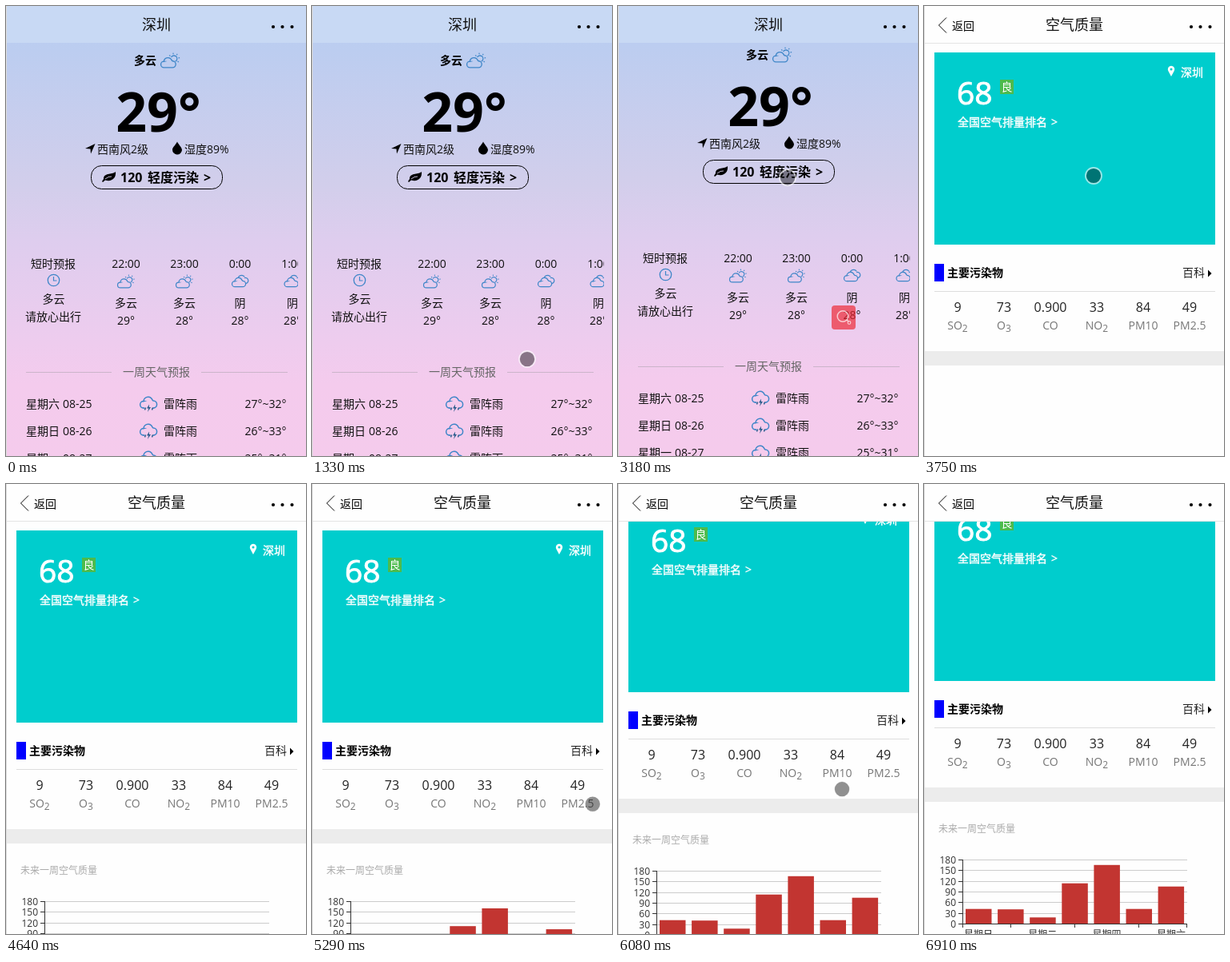
An HTML page with a canvas for the animation above (7.87 s loop, 375 px wide and 562 px high).

```html
<!DOCTYPE html>
<html lang="zh">
<head>
<meta charset="utf-8">
<style>
html, body { margin: 0; width: 100%; height: 100%; overflow: hidden; background: #fff; }
canvas { display: block; }
</style>
</head>
<body>
<canvas id="stage" width="375" height="562"></canvas>
<script>
const ctx = document.getElementById('stage').getContext('2d');
const W = 375, H = 562, LOOP = 7870, PI = Math.PI;
const FONT = '"Open Sans", "Noto Sans CJK SC", "Noto Sans CJK", sans-serif';
const BLUE = '#3f86c8';

const clamp = v => Math.max(0, Math.min(1, v));
const progress = (t, from, to) => clamp((t - from) / (to - from));
const easeOut = p => 1 - (1 - p) ** 3;

function text(str, x, y, size = 14, { color = '#111', weight = 400, align = 'left', outline = 0 } = {}) {
  ctx.font = `${weight} ${size}px ${FONT}`;
  ctx.fillStyle = color;
  ctx.textAlign = align;
  ctx.fillText(str, x, y);
  if (outline) {
    ctx.strokeStyle = color;
    ctx.lineWidth = outline;
    ctx.strokeText(str, x, y);
  }
}
const centered = (str, x, y, size, opts) => text(str, x, y, size, { ...opts, align: 'center' });

function rect(x, y, w, h, color) {
  ctx.fillStyle = color;
  ctx.fillRect(x, y, w, h);
}
function polygon(points, color) {
  ctx.beginPath();
  points.forEach(([x, y]) => ctx.lineTo(x, y));
  ctx.closePath();
  ctx.fillStyle = color;
  ctx.fill();
}
function stroke(color, width) {
  ctx.strokeStyle = color;
  ctx.lineWidth = width;
  ctx.stroke();
}
function strokeLine(points, color, width = 1) {
  ctx.beginPath();
  points.forEach(([x, y]) => ctx.lineTo(x, y));
  stroke(color, width);
}
function strokeArc(x, y, r, color, width, from = 0, to = 2 * PI) {
  ctx.beginPath();
  ctx.arc(x, y, r, from, to);
  stroke(color, width);
}
function disc(x, y, r, color) {
  ctx.beginPath();
  ctx.arc(x, y, r, 0, 2 * PI);
  ctx.fillStyle = color;
  ctx.fill();
}
function at(x, y, scale, draw) {
  ctx.save();
  ctx.translate(x, y);
  ctx.scale(scale, scale);
  draw();
  ctx.restore();
}

// ---- icons ----
function cloudShape() {
  ctx.beginPath();
  ctx.arc(4.6, 10, 4, PI / 2, PI * 1.55);
  ctx.arc(9.8, 6.6, 5.4, PI * 1.02, PI * 1.88);
  ctx.arc(15.8, 9.8, 4.2, PI * 1.5, PI / 2);
  ctx.closePath();
  stroke(BLUE, 1.4);
}
function cloudySun(x, y, scale) {
  at(x, y, scale, () => {
    at(0, 5.4, 0.96, cloudShape);
    strokeArc(17, 7.8, 3.8, BLUE, 1.3, -PI * 0.85, PI * 0.35);
    for (let i = 0; i < 5; i++) {
      const a = -PI * 0.8 + i * PI * 0.25, c = Math.cos(a), s = Math.sin(a);
      strokeLine([[17 + 5.6 * c, 7.8 + 5.6 * s], [17 + 7.2 * c, 7.8 + 7.2 * s]], BLUE, 1.2);
    }
  });
}
function overcast(x, y) {
  at(x, y + 2.4, 0.88, cloudShape);
  strokeArc(x + 12.5, y + 5, 4.6, BLUE, 1.2, -PI * 0.9, -PI * 0.2);
  strokeArc(x + 17.2, y + 7, 3.6, BLUE, 1.2, -PI * 0.6, PI * 0.45);
}
function storm(x, y) {
  const ink = '#2b5c8c';
  at(x, y, 1.08, cloudShape);
  rect(x + 6, y + 13, 11, 4, '#f3cbec');
  polygon([[x + 12, y + 10.5], [x + 9, y + 15.5], [x + 11.2, y + 15.5], [x + 10, y + 20], [x + 14, y + 14], [x + 11.8, y + 14]], ink);
  strokeLine([[x + 7.5, y + 14.5], [x + 6.5, y + 17.5]], ink, 1.5);
  strokeLine([[x + 16.5, y + 14.5], [x + 15.5, y + 17.5]], ink, 1.5);
}
function clock(x, y) {
  strokeArc(x, y, 7.2, BLUE, 1.3);
  strokeLine([[x, y - 4.5], [x, y + 0.5], [x + 4, y + 0.5]], BLUE, 1.2);
}
function drop(x, y) {
  ctx.beginPath();
  ctx.moveTo(x, y - 8);
  ctx.bezierCurveTo(x + 2, y - 4, x + 6, y - 1, x + 6, y + 2.5);
  ctx.arc(x, y + 2, 6, 0.1, PI);
  ctx.bezierCurveTo(x - 6, y - 1, x - 2, y - 4, x, y - 8);
  ctx.fillStyle = '#000';
  ctx.fill();
}
function leaf(x, y) {
  ctx.beginPath();
  ctx.moveTo(x + 17, y);
  ctx.bezierCurveTo(x + 18, y + 8, x + 12, y + 13, x + 4, y + 10.5);
  ctx.lineTo(x + 1, y + 13);
  ctx.lineTo(x, y + 12);
  ctx.lineTo(x + 2, y + 9);
  ctx.bezierCurveTo(x + 2, y + 1, x + 12, y + 4, x + 17, y);
  ctx.fillStyle = '#000';
  ctx.fill();
  strokeLine([[x + 4, y + 9], [x + 8, y + 6.5], [x + 12, y + 6]], '#d6cfeb', 0.9);
}
function pin(x, y) {
  ctx.beginPath();
  ctx.arc(x, y - 2.5, 4.2, PI * 0.85, PI * 0.15);
  ctx.lineTo(x, y + 6.5);
  ctx.fillStyle = '#fff';
  ctx.fill();
  disc(x, y - 2.5, 1.5, '#00cdcd');
}
function menuDots() {
  [334, 345.5, 357.5].forEach(x => disc(x, 26, 2.1, '#000'));
}

// ---- weather page ----
function weatherBackground() {
  const g = ctx.createLinearGradient(0, 0, 0, H);
  [[0, '#b8cef1'], [0.1, '#bccdf0'], [0.4, '#d2ceeb'], [0.52, '#decdee'], [0.75, '#eeccee'], [0.84, '#f4cbed'], [1, '#f5cbec']]
    .forEach(([p, c]) => g.addColorStop(p, c));
  ctx.fillStyle = g;
  ctx.fillRect(0, 0, W, H + 10);
}

function hourly() {
  const hours = [[150, '22:00', '多云', '29°'], [223, '23:00', '多云', '28°'], [292.5, '0:00', '阴', '28°'], [358, '1:00', '阴', '28°']];
  ctx.save();
  ctx.beginPath();
  ctx.rect(0, 300, 365, 110);
  ctx.clip();
  hours.forEach(([x, hour, sky, temp], i) => {
    centered(hour, x, 327);
    if (i < 2) cloudySun(x - 11, 335, 0.9);
    else overcast(x - 10.5, 336);
    centered(sky, x, 376);
    centered(temp, x, 398);
  });
  ctx.restore();
}

function weatherPage(scroll) {
  ctx.save();
  ctx.translate(0, -scroll);
  weatherBackground();
  text('多云', 160, 73, 14, { weight: 700, color: '#000' });
  cloudySun(193, 58, 1);
  centered('29°', 190.5, 156.5, 68, { weight: 700, color: '#000' });

  polygon([[111.5, 172], [106, 184.5], [105.5, 178.5], [99, 178]], '#000');
  text('西南风2级', 114, 184);
  drop(214, 177.5);
  text('湿度89%', 223, 184);

  ctx.beginPath();
  ctx.roundRect(106.5, 199.5, 164, 29, 13);
  stroke('#000', 1);
  leaf(120, 207);
  const bold = { weight: 700, color: '#000' };
  text('120', 143, 220, 16, bold);
  text('轻度污染', 177, 220, 16, bold);
  text('>', 247, 220, 16, bold);

  centered('短时预报', 59, 327);
  clock(59.5, 342.5);
  centered('多云', 59.5, 371);
  centered('请放心出行', 59, 393);
  hourly();

  rect(25, 457, 107, 1, '#cbb4ca');
  rect(244, 457, 108, 1, '#cbb4ca');
  centered('一周天气预报', 188, 462, 14, { color: '#666' });

  [['星期六', '08-25', '27°~32°'], ['星期日', '08-26', '26°~33°'], ['星期一', '08-27', '25°~31°']].forEach(([day, date, temp], i) => {
    const y = 502 + i * 34;
    text(day, 25, y);
    text(date, 71, y);
    storm(167, y - 15);
    text('雷阵雨', 197, y);
    centered(temp, 324.5, y);
  });
  ctx.restore();

  rect(0, 0, W, 46, '#c8d9f4');
  centered('深圳', 188, 30, 18);
  menuDots();
}

// ---- air quality page ----
function chart(grow) {
  const left = 48, right = 329, base = 601, step = 80 / 6;
  text('未来一周空气质量', 18, 487, 12, { color: '#aaa' });
  for (let i = 0; i <= 6; i++) {
    const y = Math.round(base - i * step);
    rect(left, y, right - left, 1, '#ccc');
    rect(left - 5, y, 5, 1, '#333');
    text(String(i * 30), 40, y + 4.5, 12, { color: '#333', align: 'right' });
  }
  [18.3, 17.8, 7.7, 50.3, 73.2, 18.3, 46.3].forEach((h, i) => {
    rect(52 + i * 40.1, base - h * grow, 32.5, h * grow, '#c23531');
  });
  rect(left, 521, 1, 81, '#333');
  rect(left, base, right - left, 1, '#333');
  [48, 108, 188, 268, 328].forEach(x => rect(x, base, 1, 5, '#333'));
  ['星期日', '星期二', '星期四', '星期六'].forEach((d, i) => centered(d, 68 + i * 80.3, 619, 12, { color: '#333' }));
}

function pollutants() {
  const items = [['9', 'SO', '2'], ['73', 'O', '3'], ['0.900', 'CO', ''], ['33', 'NO', '2'], ['84', 'PM10', ''], ['49', 'PM2.5', '']];
  items.forEach(([value, name, sub], i) => {
    const x = 42 + i * 58;
    centered(value, x, 382, 16, { color: '#222' });
    ctx.font = `14px ${FONT}`;
    const nameWidth = ctx.measureText(name).width;
    const start = x - (nameWidth + (sub ? 7 : 0)) / 2;
    text(name, start, 404, 14, { color: '#777' });
    text(sub, start + nameWidth, 407, 12, { color: '#777' });
  });
}

function airPage(t, scroll) {
  const white = { color: '#fff', outline: 0.4 };
  rect(0, 0, W, H, '#fefefe');
  ctx.save();
  ctx.translate(0, -scroll);
  rect(13, 58, 351, 240, '#00cdcd');
  text('68', 41, 123, 39, { color: '#fff', outline: 1 });
  rect(95, 92, 17, 18, '#4cbb4c');
  centered('良', 103.5, 106, 14, { color: '#fff' });
  text('全国空气排量排名', 42, 150, 14, white);
  text('>', 159, 150, 14, white);
  pin(309, 81.5);
  text('深圳', 321, 88, 14, white);

  rect(13, 322, 12, 22, '#00f');
  text('主要污染物', 29, 338, 14, { weight: 700, color: '#000' });
  text('百科', 323, 338, 14, { color: '#222' });
  polygon([[355, 329.5], [359.5, 334], [355, 338.5]], '#000');
  rect(13, 356, 351, 1, '#ddd');
  pollutants();
  rect(0, 431, W, 18, '#ececec');
  if (t >= 4640) chart(easeOut(progress(t, 4600, 5600)));
  ctx.restore();

  rect(0, 0, W, 46, '#fefefe');
  rect(0, 46, W, 1, '#e4e4e4');
  strokeLine([[28, 14.5], [18.5, 24], [28, 33.5]], '#000');
  text('返回', 35, 30, 14, { color: '#000' });
  centered('空气质量', 188, 30, 18);
  menuDots();
}

// ---- pointer and floating search button ----
const pointerPath = [
  [0, 390, 358], [800, 390, 358], [830, 380, 369], [1100, 310, 389], [1330, 269, 441], [1430, 267, 442],
  [1560, 267, 432], [1650, 267, 430], [1860, 267, 430], [2000, 267, 420], [2210, 267, 420],
  [2350, 267, 405], [2880, 212, 215], [3120, 212, 215], [3420, 212, 212], [3870, 212, 212],
  [4210, 392, 320], [5200, 392, 372], [5240, 361, 392], [5590, 291, 445], [5660, 277, 437],
  [5810, 277, 437], [5870, 273, 437], [6440, 292, 286], [6650, 292, 286], [6910, 390, 530], [LOOP, 390, 530]
];

function pointer(t) {
  const i = pointerPath.findIndex(k => k[0] > t);
  const [t0, x0, y0] = pointerPath[i - 1], [t1, x1, y1] = pointerPath[i];
  const p = progress(t, t0, t1);
  const x = x0 + (x1 - x0) * p, y = y0 + (y1 - y0) * p;
  disc(x, y, 9.5, 'rgba(0,0,0,.43)');
  strokeArc(x, y, 10, 'rgba(255,255,255,.6)', 1.8);
}

function searchButton(t) {
  const alpha = progress(t, 2200, 2340) * (1 - progress(t, 3120, 3420));
  if (!alpha) return;
  ctx.save();
  ctx.globalAlpha = alpha * 0.85;
  ctx.beginPath();
  ctx.roundRect(267, 374, 30, 30, 4);
  ctx.fillStyle = '#ee2530';
  ctx.fill();
  strokeArc(281, 387.5, 6.8, '#fff', 1.5);
  strokeLine([[286, 392], [288, 394]], '#fff', 1.5);
  strokeArc(289, 395.5, 1.8, '#fff', 1.2);
  ctx.restore();
}

function draw(t) {
  if (t < 3570) {
    weatherPage(Math.round(7 * progress(t, 1840, 2000)));
    searchButton(t);
  } else {
    airPage(t, Math.round(52 * easeOut(progress(t, 5880, 6440))));
  }
  pointer(t);
  rect(0, 0, 1, H, '#dcdcdc');
}

const begin = performance.now();
function tick() {
  draw((performance.now() - begin) % LOOP);
  requestAnimationFrame(tick);
}
tick();
</script>
</body>
</html>
```
